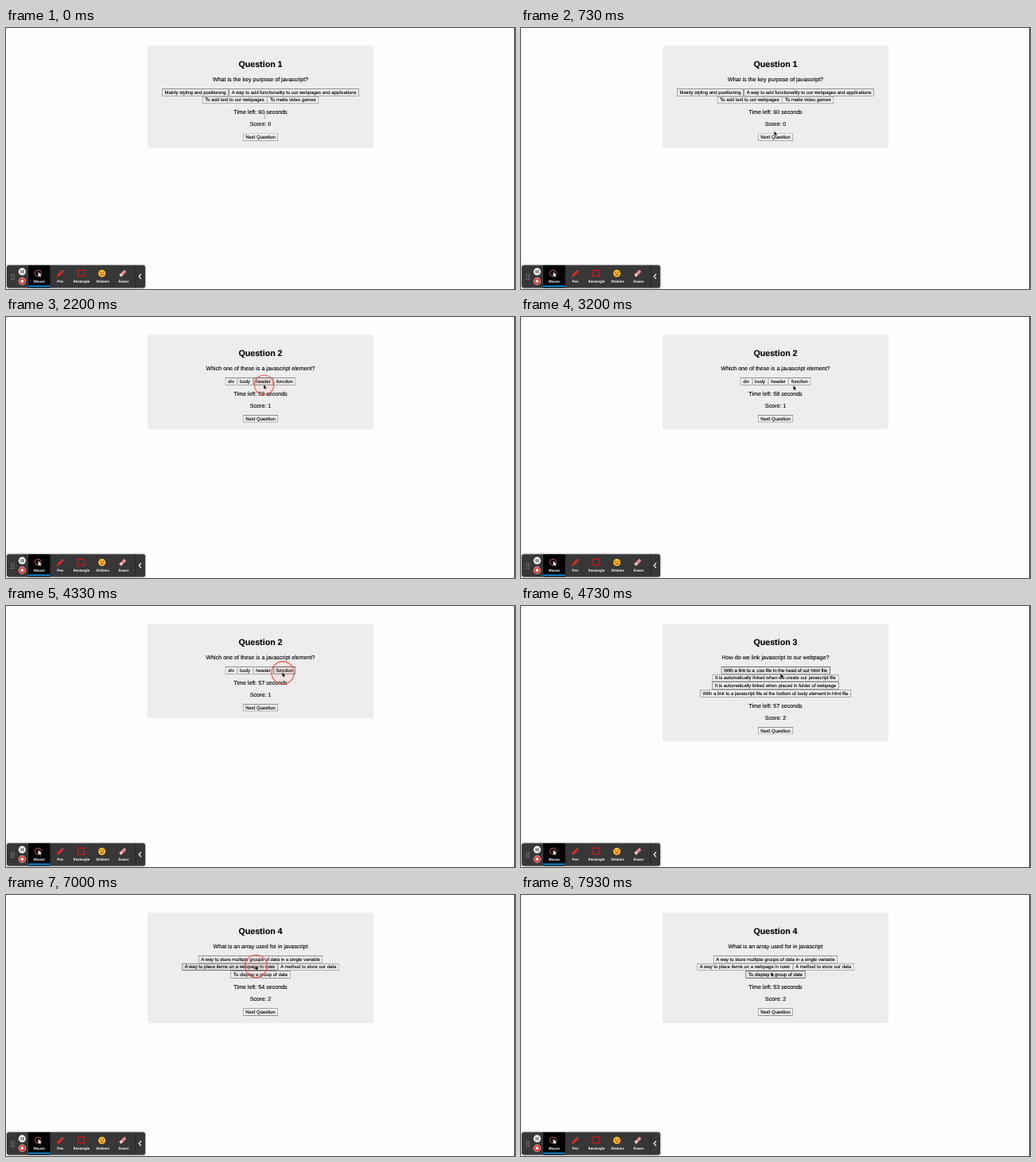
Write an HTML page that moves like this. It is 640 px wide and 328 px high and loops after 8000 ms.

```html
<!DOCTYPE html>
<html lang="en">
<head>
<meta charset="utf-8">
<title>Quiz</title>
<style>
html, body { margin: 0; width: 100%; height: 100%; overflow: hidden; background: #fdfdfd; }
#page { position: absolute; left: 0; top: 0; width: 1440px; height: 738px; transform: scale(.44444); transform-origin: 0 0;
  font: 16px/18px "Liberation Sans", Arial, sans-serif; color: #000; text-align: center;
  text-rendering: geometricPrecision; -webkit-text-stroke: .25px #000; }
#quiz { position: absolute; left: 400px; top: 50px; width: 600px; padding: 20px; background: #ededed; border-radius: 8px; }
h2 { font-size: 24px; line-height: 27px; margin: 19px 0 21px; }
p { margin: 16px 0; }
.row { display: flex; flex-wrap: wrap; justify-content: center; }
.row span { height: 21.5px; margin-bottom: .2px; padding: 0 8.2px; font-size: 13.333px; line-height: 21.5px; white-space: nowrap;
  background: #f0f0f0; border-radius: 3px; box-shadow: inset 0 0 0 1.5px #707070; }
.row .hover { background: #e4e4e4; box-shadow: inset 0 0 0 1.7px #454545; }
svg { position: absolute; left: 0; top: 0; pointer-events: none; }
svg text { font: bold 4.5px Roboto, sans-serif; fill: #f2f2f2; text-anchor: middle; text-rendering: geometricPrecision; }
#bar { filter: drop-shadow(0 .3px 1.2px #000a); }
</style>
</head>
<body>
<div id="page">
  <div id="quiz">
    <h2 id="title"></h2>
    <p id="ask"></p>
    <div class="row" id="answers"></div>
    <p id="time"></p>
    <p id="score"></p>
    <div class="row"><span>Next Question</span></div>
  </div>
</div>
<svg width="640" height="328" viewBox="0 0 640 328">
  <path d="M639.5 0V328" stroke="#333"/>
  <!-- toolbar -->
  <rect id="bar" x="1" y="298.3" width="174" height="28.2" rx="2.5" fill="#373737"/>
  <rect x="28" y="298.3" width="27.5" height="28.2" fill="#000"/>
  <rect x="28" y="323.6" width="27.5" height="1.8" fill="#1592e6"/>
  <path d="M163 298.3V326.5" stroke="#222" stroke-width=".8"/>
  <path d="M7 309.5v7M9.8 309.5v7" stroke="#aaa" stroke-width="1.2" stroke-dasharray="1.2 1.6"/>
  <circle cx="20.3" cy="306.2" r="4.6" fill="#f2f2f2"/>
  <path d="M19.1 304.2v4M21.5 304.2v4" stroke="#333" stroke-width="1.1"/>
  <circle cx="20.3" cy="318.2" r="4.6" fill="#f3d9d7"/>
  <circle cx="20.3" cy="318.2" r="4" fill="#d93a35"/>
  <rect x="18.7" y="316.6" width="3.2" height="3.2" fill="#fff"/>
  <circle cx="40.3" cy="308.2" r="4" fill="none" stroke="#d9605a" stroke-width=".9"/>
  <path d="M40.5 306.5v6l1.4-1.2 1 2 1-.5-1-1.9h1.9z" fill="#fff"/>
  <path d="M64 312.7l.7-2.8 4.6-4.6 2.1 2.1-4.6 4.6z" fill="#e8262b"/>
  <path d="M69.8 304.8l.7-.7 2.1 2.1-.7.7z" fill="#f0555a"/>
  <rect x="90.6" y="304.2" width="8" height="7.8" fill="none" stroke="#d8141b" stroke-width="1.2"/>
  <circle cx="120.6" cy="308.4" r="4.6" fill="#f8b62d"/>
  <circle cx="119" cy="307.2" r=".7" fill="#6b3d0c"/>
  <circle cx="122.2" cy="307.2" r=".7" fill="#6b3d0c"/>
  <path d="M118 309.5q2.6 3.2 5.2 0z" fill="#b5442a"/>
  <g transform="translate(146.8 308.3) rotate(-45)">
    <rect x="-4.6" y="-1.8" width="9.2" height="3.6" rx=".8" fill="#e58a97"/>
    <rect x="-4.6" y="-1.8" width="3" height="3.6" rx=".8" fill="#efc9cf"/>
  </g>
  <text x="41.7" y="320">Mouse</text>
  <text x="68.2" y="320">Pen</text>
  <text x="95" y="320">Rectangle</text>
  <text x="121.5" y="320">Stickers</text>
  <text x="148" y="320">Eraser</text>
  <path d="M170 309.2l-2.8 3.1 2.8 3.1" fill="none" stroke="#fff" stroke-width="1.2"/>
  <!-- pointer -->
  <circle id="ring" fill="#ff7a70" fill-opacity=".1" stroke="#df5a54" stroke-width="1.4"/>
  <path id="arrow" d="M0 0V5.2L1.2 4.1 2 6 2.9 5.6 2.1 3.8H3.7Z" fill="#000" stroke="#fff" stroke-width=".5" paint-order="stroke"/>
  <path id="beam" d="M-1.4-3.6Q0-3.6 0-2.8V2.8Q0 3.6-1.4 3.6M1.4-3.6Q0-3.6 0-2.8M0 2.8Q0 3.6 1.4 3.6" fill="none" stroke="#777" stroke-width=".5"/>
</svg>
<script>
const $ = id => document.getElementById(id);
const LOOP = 8000, SHRINK = 300, RADIUS = 14.2;

// start time, score, question, answers
const questions = [
  [0, 0, "What is the key purpose of javascript?",
    ["Mainly styling and positioning", "A way to add functionality to our webpages and applications",
     "To add text to our webpages", "To make video games"]],
  [2160, 1, "Which one of these is a javascript element?", ["div", "body", "header", "function"]],
  [4400, 2, "How do we link javascript to our webpage?",
    ["With a link to a .css file in the head of our html file",
     "It is automatically linked when we create our javascript file",
     "It is automatically linked when placed in folder of webpage",
     "With a link to a javascript file at the bottom of body element in html file"]],
  [7000, 2, "What is an array used for in javascript",
    ["A way to store multiple groups of data in a single variable", "A way to place items on a webpage in rows",
     "A method to store our data", "To display a group of data"]]
];

// pointer moves: start time, end time, x, y reached
const moves = [
  [60, 700, 318.5, 129.8], [800, 1000, 314, 99.5], [1240, 1600, 324, 85.1], [2500, 3150, 342.5, 86.3],
  [3220, 3380, 347.5, 86], [3600, 3860, 344, 86], [4040, 4130, 347.5, 83.6], [4450, 4930, 314, 86],
  [5380, 5930, 313.7, 89.2], [7100, 7600, 314.5, 97]
];

// press time, release time
const clicks = [[2130, 2160], [3400, 3470], [4330, 4400], [6730, 7000]];

let shown = -1;

function showQuestion(i) {
  if (i === shown) return;
  shown = i;
  const [, score, ask, answers] = questions[i];
  $("title").textContent = "Question " + (i + 1);
  $("ask").textContent = ask;
  $("score").textContent = "Score: " + score;
  $("answers").innerHTML = answers.map(a => `<span>${a}</span>`).join("");
}

function pointerAt(t) {
  let x = 325.3, y = 109.8;
  for (const [start, end, toX, toY] of moves) {
    const p = Math.min(1, Math.max(0, (t - start) / (end - start))), e = p * p * (3 - 2 * p);
    x += (toX - x) * e;
    y += (toY - y) * e;
  }
  return [x, y];
}

function drawRing(t) {
  const click = clicks.find(([down, up]) => t >= down && t < up + SHRINK);
  $("ring").style.display = click ? "" : "none";
  if (!click) return;
  const [down, up] = click, [x, y] = pointerAt(down), p = Math.max(0, (t - up) / SHRINK);
  $("ring").setAttribute("cx", x + .6);
  $("ring").setAttribute("cy", y + .3);
  $("ring").setAttribute("r", RADIUS * (1 - p));
  $("ring").setAttribute("opacity", .85 * (1 - p * p));
}

function drawPointer(t) {
  const [x, y] = pointerAt(t);
  for (const b of document.querySelectorAll(".row span")) {
    const r = b.getBoundingClientRect();
    b.classList.toggle("hover", x >= r.left && x < r.right && y >= r.top && y < r.bottom);
  }
  const overText = (id, half) => {
    const r = $(id).getBoundingClientRect();
    return Math.abs(x - 319.5) < half && y > r.top && y < r.bottom;
  };
  const beam = overText("time", 34) || overText("score", 14);
  $("beam").style.display = beam ? "" : "none";
  $("arrow").style.display = beam ? "none" : "";
  $(beam ? "beam" : "arrow").setAttribute("transform", `translate(${x} ${y})`);
}

function draw() {
  const t = performance.now() % LOOP;
  showQuestion(questions.filter(q => q[0] <= t).length - 1);
  const left = 60 - Math.max(0, Math.floor((t - 860) / 1000));
  $("time").textContent = `Time left: ${left} seconds`;
  drawRing(t);
  drawPointer(t);
  requestAnimationFrame(draw);
}
draw();
</script>
</body>
</html>
```
